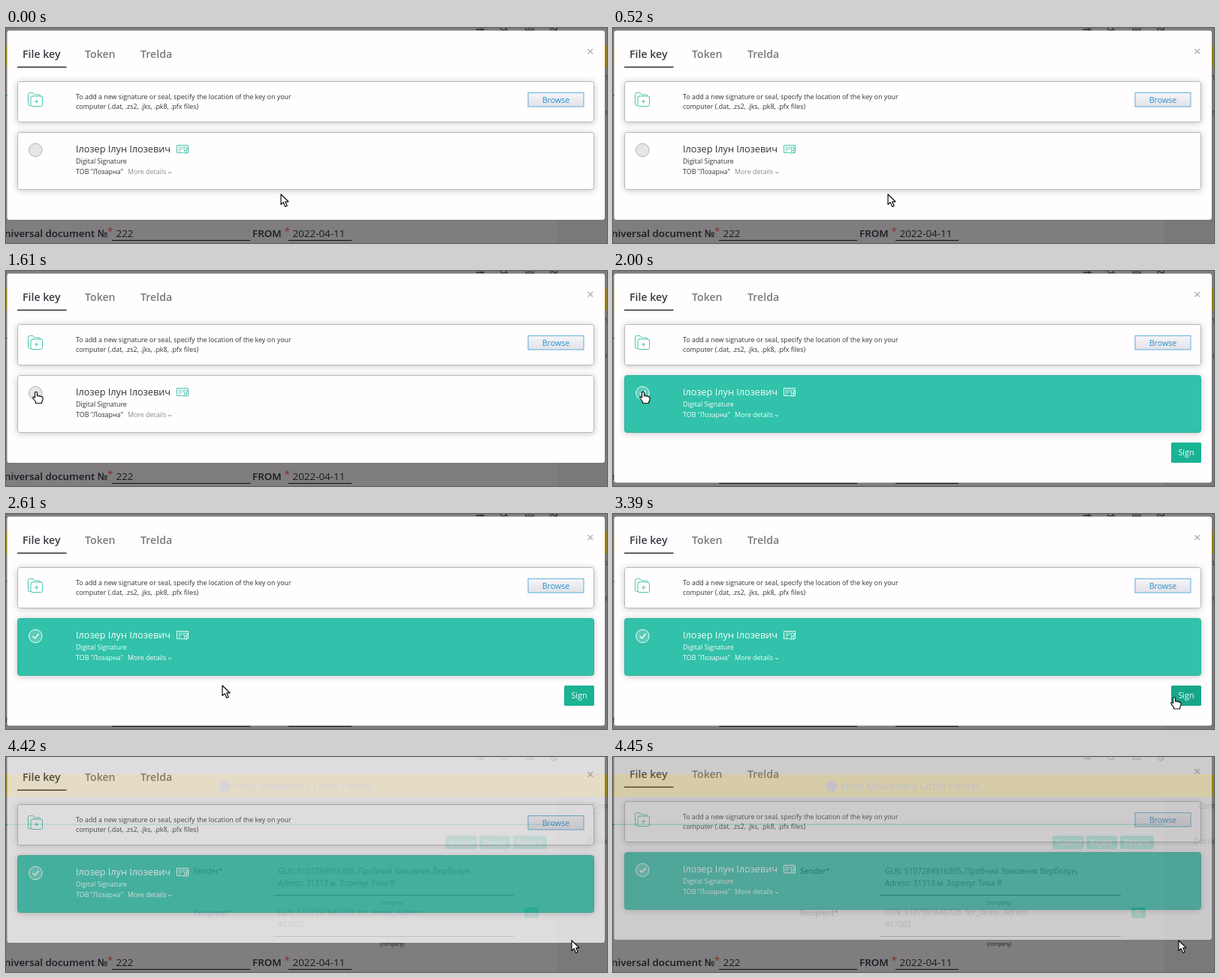
Animation of 800x287 px, one loop 4.51 s. Source, as an HTML page:

```html
<!DOCTYPE html>
<html lang="en">
<head>
<meta charset="utf-8">
<title>File key signing</title>
<style>
  html, body { margin: 0; width: 100%; height: 100%; overflow: hidden; background: #7d7b7d; }
  svg { display: block; width: 800px; height: 287px; }
  text { font-family: "Open Sans", "Noto Sans", sans-serif; font-size: 8.9px; fill: #333; }
  .page text { font-size: 10.2px; fill: #1a1a1e; }
  .page .field { font-size: 13.4px; }
  .page .tiny { font-size: 6.6px; }
  .page .star { fill: #8c2a22; }
  .page .small-star { fill: #1a1a1e; font-size: 9px; }
  .page .soft { fill: #38363c; }
  .page .banner { font-size: 13.9px; fill: #66646c; }
  .bold, .tab { font-weight: 600; }
  .tab { font-size: 14.15px; fill: #7b7b7b; }
  .tab.on { fill: #3b3b44; }
  .line { fill: none; stroke: #4cc5b0; stroke-linejoin: round; stroke-linecap: round; }
  .card { fill: #fffdfe; stroke: #b9b7bb; filter: url(#shadow); }
  .name { font-size: 12.7px; }
  .more { fill: #8c8a8e; }
  .arrow { fill: none; stroke: #8c8a8e; }
  .selected .card { fill: #33c1aa; stroke: #2fb39d; }
  .selected text { fill: #f4fffc; }
  .selected .line, .selected .arrow { stroke: #e6fff9; }
  .radio { fill: #e6e5e7; stroke: #b4b3b6; }
  .selected .radio { fill: #5ccdba; stroke: #e9fffa; }
  .check { fill: none; stroke: #fff; stroke-width: 1.4; visibility: hidden; }
  .selected .check { visibility: visible; }
  .pointer { fill: #fff; stroke: #111; stroke-width: 1.2; stroke-linejoin: round; }
</style>
</head>
<body>
<svg viewBox="0 0 800 287">
  <defs>
    <filter id="shadow" x="-5%" y="-30%" width="110%" height="170%">
      <feDropShadow dx="0" dy="1" stdDeviation="4" flood-opacity=".22"/>
    </filter>
    <linearGradient id="button" x2="0" y2="1">
      <stop stop-color="#f6f5f8"/><stop offset="1" stop-color="#e2e1e8"/>
    </linearGradient>
  </defs>

  <g class="page">
    <rect width="800" height="287" fill="#7f7d7f"/>
    <rect x="734" y="53" width="66" height="234" fill="#7a787b"/>
    <g fill="none" stroke="#2c2c30" stroke-width="1.3">
      <path d="M626 2h11M633 0v4M665 1l4 4M692-5v8h10v-8M694 0h6M726 0l6 3 2-4"/>
      <circle cx="662" cy="-1" r="4"/><circle cx="729" cy="0" r="4.5"/>
    </g>
    <rect y="23" width="800" height="30" fill="#97801f"/>
    <circle cx="291" cy="39" r="7.5" fill="#66646c"/>
    <text class="banner bold" x="303" y="43.5">Help Meadow's Little Forest</text>
    <path d="M0 90H733" stroke="#0d6b58" stroke-width="2"/>
    <g fill="#0d6b58">
      <rect x="585" y="105" width="42" height="18" rx="2"/>
      <rect x="630" y="105" width="41" height="18" rx="2"/>
      <rect x="675" y="105" width="45" height="18" rx="2"/>
      <rect x="690" y="201" width="19" height="14" rx="2"/>
    </g>
    <g class="bold">
      <text style="fill:#7f7d7f" x="590" y="118">Submit</text>
      <text style="fill:#7f7d7f" x="635" y="118">Reject</text>
      <text style="fill:#7f7d7f" x="680" y="118">Return</text>
      <text x="249" y="156">Sender<tspan class="small-star" dy="-1">*</tspan></text>
      <text class="soft" x="249" y="211.5">Recipient<tspan class="small-star" dy="-1">*</tspan></text>
    </g>
    <circle cx="699" cy="207" r="2.7" fill="none" stroke="#7f7d7f"/>
    <path d="M701 209l3 3" stroke="#7f7d7f"/>
    <text x="362" y="155.7">GLN: 5107284916305, Пробний Замовник Верболун,</text>
    <text x="362" y="171.7">Adress: 31313 м. Зорелуг Тиха 8</text>
    <text class="soft" x="362" y="211.2">GLN: 5107391640728, for_demo, Adress:</text>
    <text class="soft" x="362" y="226.7">417002</text>
    <text class="tiny" x="498" y="197">(company)</text>
    <text class="tiny" x="498" y="251.5">(company)</text>
    <text class="soft" x="779" y="68.5">Comments</text>
    <text class="soft" x="773" y="115.5">Documents</text>
    <path d="M356 184.5H676M356 239.5H676M141 283.5H325M376 283.5H460" stroke="#111"/>
    <text class="field bold" x="135.5" y="279" text-anchor="end">Universal document №</text>
    <text class="field star" x="135" y="276">*</text>
    <text class="field" x="146.5" y="279">222</text>
    <text class="field bold" x="328" y="279">FROM</text>
    <text class="field star" x="370.5" y="276">*</text>
    <text class="field" x="381.5" y="279">2022-04-11</text>
  </g>

  <g id="modal">
    <rect id="sheet" x="1.5" y="3.5" width="795.5" height="252.5" rx="3" fill="#fffdfe"/>
    <text class="tab on" x="22" y="39.5">File key</text>
    <text class="tab" x="105" y="39.5">Token</text>
    <text class="tab" x="179" y="39.5">Trelda</text>
    <path d="M15 52.3H80.5" stroke="#333" stroke-width="1.6"/>
    <path d="M774.5 28l6.5 6.5m0-6.5l-6.5 6.5" stroke="#b5b3b7" stroke-width="1.5"/>

    <rect class="card" x="15.5" y="71.5" width="767" height="54" rx="3"/>
    <path class="line" d="M33 103.500h-1.500q-2 0-2-2V88.500q0-2 2-2h4.500l2 2.500h6q2 0 2 2M35 91h11.500q2 0 2 2v9.500q0 2-2 2H35q-2 0-2-2V93q0-2 2-2zM40.700 95.800v4.400m-2.200-2.200h4.400"/>
    <text x="93" y="95.200">To add a new signature or seal, specify the location of the key on your</text>
    <text x="93" y="107.800">computer (.dat, .zs2, .jks, .pk8, .pfx files)</text>
    <rect x="695" y="86.500" width="74" height="18.500" fill="url(#button)" stroke="#5fb0d8"/>
    <text x="732" y="99.800" text-anchor="middle" style="font-size:10.700px;fill:#2592cb">Browse</text>

    <g id="key">
      <rect class="card" x="15.500" y="139.500" width="767" height="76" rx="3"/>
      <circle class="radio" cx="39.300" cy="163" r="8.800"/>
      <path class="check" d="M35.500 163l3 3 5-6"/>
      <text class="name" x="93" y="166.300">Ілозер Ілун Ілозевич</text>
      <path class="line" d="M235 166.500h-7.500v-10h15v10h-2M230 159h2.500m1.500 0h2M230 161.500h4m-4 2.500h2M238 163.500l-1.500 4 2-1 1.500 1 .500-4"/>
      <circle class="line" cx="239" cy="161" r="2.300"/>
      <text x="93" y="181">Digital Signature</text>
      <text x="93" y="195.300">ТОВ "Лозарна"</text>
      <text class="more" x="162" y="195.300">More details</text>
      <path class="arrow" d="M216 192l2 2 2-2"/>
    </g>
    <g id="sign">
      <rect id="signBox" x="743" y="229" width="40" height="27" rx="1.500"/>
      <text x="763" y="246.300" text-anchor="middle" style="font-size:10.700px;fill:#fff">Sign</text>
    </g>
  </g>

  <g id="cursor" class="pointer">
    <path id="arrow" d="M0 0V13.500L3.200 10.700 5.700 16.500 8.200 15.400 5.700 9.800H10z"/>
    <path id="hand" d="M-1.500 1.300q0-1.500 1.500-1.500t1.500 1.500v4q1.500-.9 2.700.3 1.400-.6 2.500.6 2-.3 2.300 1.400v2.900l-1.300 2.500v2H-.500v-2L-4 8.500q-.6-1.800 1-1.900l1.500 1z"/>
  </g>
</svg>
<script>
const LOOP = 4510, SELECT = 1670, CLOSE = 4390;
const $ = id => document.getElementById(id);
const show = (el, on) => el.setAttribute("visibility", on ? "visible" : "hidden");

// Cursor stops: time, x, y
const path = [
  [0, 366, 222], [1100, 366, 222], [1360, 40, 161.5], [2050, 40, 161.5],
  [2580, 288, 229], [2610, 288, 229], [3120, 747, 245],
  [3700, 747, 245], [4210, 753, 245], [LOOP, 753, 245]
];

function cursorAt(t) {
  const i = path.findIndex(stop => stop[0] > t);
  const [t0, x0, y0] = path[i - 1], [t1, x1, y1] = path[i];
  const u = (t - t0) / (t1 - t0), e = u * u * (3 - 2 * u);
  return [x0 + (x1 - x0) * e, y0 + (y1 - y0) * e];
}

function draw(t) {
  const [x, y] = cursorAt(t);
  const closing = t >= CLOSE, selected = t >= SELECT, signShown = selected && !closing;
  const overSign = signShown && x >= 743 && y >= 229;
  const overCard = y > 139 && y < 216;

  $("cursor").setAttribute("transform", `translate(${x} ${y})`);
  show($("hand"), overSign || overCard);
  show($("arrow"), !(overSign || overCard));

  $("key").setAttribute("class", selected ? "selected" : "");
  $("sheet").setAttribute("height", signShown ? 279 : 252.5);
  show($("sign"), signShown);
  $("signBox").setAttribute("fill", overSign ? "#18a689" : "#1ab394");

  const fade = closing ? Math.min(3, Math.floor((t - CLOSE) / 30) + 1) / 3 : 0;
  $("modal").setAttribute("transform", `translate(0 ${-12 * fade})`);
  $("modal").setAttribute("opacity", 1 - 0.39 * fade);
}

const start = performance.now();
function tick() {
  draw((performance.now() - start) % LOOP);
  requestAnimationFrame(tick);
}
tick();
</script>
</body>
</html>
```
